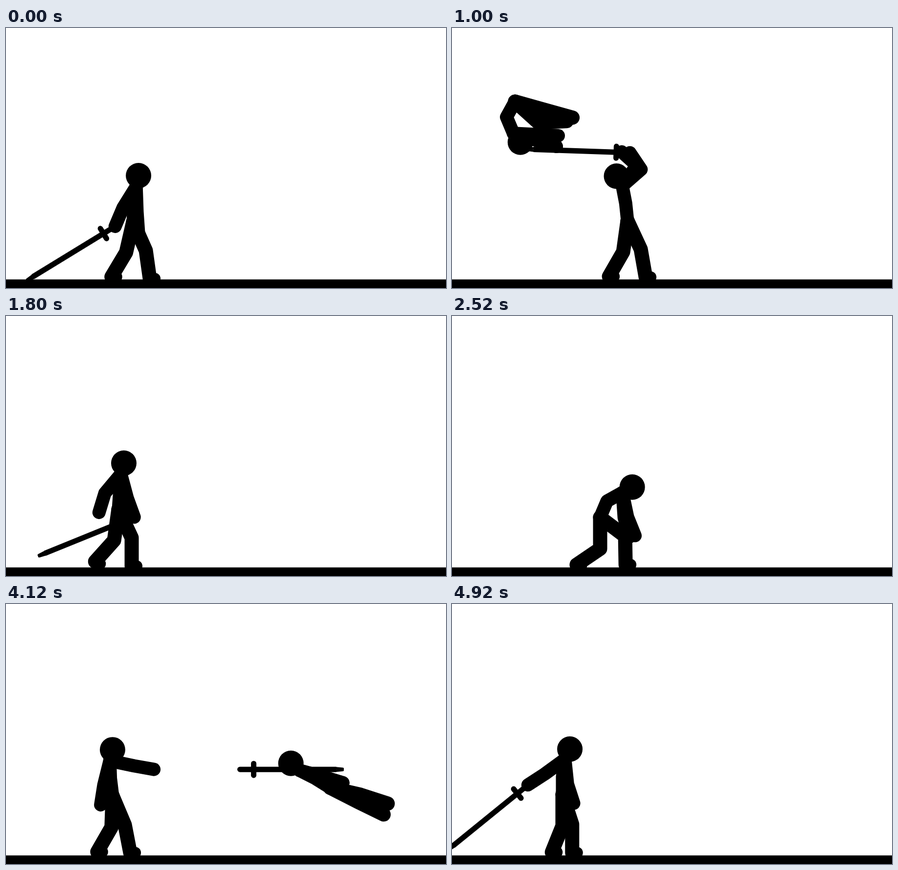
Animation of 900x530 px, one loop 4.96 s. Source, as an HTML page with a canvas:

```html
<!DOCTYPE html>
<html lang="en">
<head>
<meta charset="utf-8">
<title>Sword fighter</title>
<style>
html, body { margin: 0; width: 900px; height: 530px; overflow: hidden; background: #fff; }
canvas { display: block; }
</style>
</head>
<body>
<canvas id="stage" width="900" height="530"></canvas>
<script>
const ctx = document.getElementById('stage').getContext('2d');
const LOOP = 4960, STEP = 40, GROUND = 512.5, ANKLE = 507;
const SPINE = 36, NECK = 23, UPPER = 51, FORE = 41, THIGH = 64, SHIN = 58;
const GUARD = 28, BLADE = 197, TIP = 213;

// Limbs are [upper, lower] in degrees, clockwise on screen, 0 pointing right.
const drag = { trunk: [-87, -83, -78], sword: [122, 113], free: [88, 86],
  back: [103, 121], front: [66, 82], blade: 148.6, sink: 4 };
const thrust = { trunk: [-75, -70, -62], sword: [8, 4], free: [60, 10],
  back: [122, 142], front: [42, 88], blade: 0, sink: 0 };
const overhead = { trunk: [-96, -101, -121], sword: [-41, -124], free: [-55, -138],
  back: [98, 120], front: [65, 80], blade: -178, sink: 1 };
const march = { trunk: [-86, -86, -75], sword: [75, 70], free: [130, 107],
  back: [98, 132], front: [65, 90], blade: 158, sink: 3 };
const crouch = { trunk: [-67, -29, -29], sword: [78, 68], free: [86, 75],
  back: [90, 146], front: [37, 89], blade: 0, sink: 0 };
const point = { trunk: [-97, -92, -76], sword: [21, 21], free: [104, 99],
  back: [92, 120], front: [67, 79], blade: 0, sink: 0 };
const spear = { trunk: [-119, -128, -149], sword: [-70, 78], free: [11, -140],
  back: [94, 133], front: [75, 104], blade: -43, sink: 4 };
const rest = { trunk: [-90, -82, -64], sword: [144, 147], free: [84, 72],
  back: [90, 112], front: [72, 90], blade: 141, sink: 0 };
const lift = { ...overhead, sword: [-38, -40], free: [-30, -44], blade: -40 };
const cock = { ...point, sword: [205, 245], free: [15, 10], blade: -25 };
const idle = { ...point, sword: [95, 85], free: [112, 108] };
const beckon = { ...point, sword: [12, 10] };

const hang = { trunk: [-116, -121, -109], sword: [47, 49], free: [48, 48],
  back: [59, 58], front: [45, 50] };
const curl = { trunk: [119, 67, 52], sword: [3, 3], free: [17, 17],
  back: [15.5, 15.5], front: [42, -3] };

// Time, hip x, pose
const story = [
  [0, 260, drag], [120, 260, drag], [400, 272, drag], [680, 325, thrust],
  [840, 350, lift], [1000, 359, overhead], [1240, 356, overhead],
  [1440, 325, thrust], [1800, 230, march], [2040, 214, cock], [2160, 270, thrust],
  [2360, 303, crouch], [2520, 303, crouch], [2880, 218, idle], [3480, 218, point],
  [3680, 218, beckon], [4200, 218, beckon], [4600, 136, spear], [4920, 226, rest]
];
const RELEASE = 2160, GONE = 2360, RETURN = 3920, CATCH = 4200;

const rad = a => a * Math.PI / 180;
const reach = ([x, y], a, len) => [x + len * Math.cos(rad(a)), y + len * Math.sin(rad(a))];
const clamp = f => Math.max(0, Math.min(1, f));
const ease = f => f * f * (3 - 2 * f);

// Turns each angle the short way round.
function turn(a, b, f) {
  if (Array.isArray(a)) return a.map((v, i) => turn(v, b[i], f));
  const d = ((b - a) % 360 + 540) % 360 - 180;
  return a + d * f;
}

function blend(a, b, f) {
  const pose = {};
  for (const part in a) pose[part] = turn(a[part], b[part], f);
  return pose;
}

function rotate(pose, angle) {
  const turned = {};
  for (const part in pose) turned[part] = pose[part].map(a => a + angle);
  return turned;
}

function limb(from, [up, lo], l1, l2) {
  const joint = reach(from, up, l1);
  return [from, joint, reach(joint, lo, l2)];
}

function skeleton(x, y, pose) {
  const trunk = limb([x, y], pose.trunk, SPINE, SPINE), neck = trunk[2];
  return {
    trunk, neck,
    head: reach(neck, pose.trunk[2], NECK),
    arms: [pose.sword, pose.free].map(a => limb(neck, a, UPPER, FORE)),
    legs: [pose.back, pose.front].map(a => limb([x, y], a, THIGH, SHIN))
  };
}

// Skeleton with its lower foot on the ground.
function standing(x, pose) {
  const drop = leg => limb([0, 0], leg, THIGH, SHIN)[2][1];
  const y = ANKLE - Math.max(drop(pose.back), drop(pose.front));
  return skeleton(x, y + (pose.sink || 0), pose);
}

function fighter(t) {
  const next = story.findIndex(k => k[0] > t);
  const [t1, x1, p1] = story.at(next < 0 ? -1 : next);
  const [t0, x0, p0] = next < 0 ? story.at(-1) : story[next - 1];
  const f = t1 > t0 ? ease((t - t0) / (t1 - t0)) : 0;
  const pose = blend(p0, p1, f), x = x0 + (x1 - x0) * f;
  const stride = (x1 - x0) / 5 * Math.sin(2 * Math.PI * f);
  pose.back = pose.back.map(a => a + stride);
  pose.front = pose.front.map(a => a - stride);
  const body = standing(x, pose);
  return { x, body, hand: body.arms[0][2], blade: pose.blade };
}

function sword(t) {
  const flying = t > RELEASE && t < GONE;
  const { hand: [x, y], blade } = fighter(flying ? RELEASE : t);
  let drift = 0;
  if (flying) drift = (t - RELEASE) * 3.6;
  else if (t >= RETURN) drift = Math.max(0, CATCH - t) * 2.2;
  return { hand: [x + drift, y], angle: blade };
}

function runner(t) {
  const x = 940 - (t - 160) * 0.68, p = t / 70;
  const leg = q => [90 + 36 * Math.sin(q), 66 + 34 * Math.sin(q) - 18 * Math.cos(q)];
  const arm = q => [92 - 32 * Math.sin(q), 125 - 28 * Math.sin(q)];
  return standing(x, { trunk: [-100, -106, -118], sword: arm(p), free: arm(p + Math.PI),
    back: leg(p), front: leg(p + Math.PI) });
}

// Hangs on the blade by the neck, swaying from a start angle to rest.
function carried(t, hit, fling, sway) {
  const pose = rotate(hang, sway * (1 - ease(clamp((t - hit) / (fling - hit - 40)))));
  const { hand, angle } = sword(t);
  const [x, y] = reach(hand, angle, 112);
  const [dx, dy] = skeleton(0, 0, pose).neck;
  return skeleton(x + 10 - dx, y + 2 - dy, pose);
}

// Thrown off the blade over the fighter's back.
function thrown(t, fling) {
  const u = t - fling;
  const x = fighter(t).x - 230 - 2 * (u - 100), y = 126 + 0.0024 * u * u;
  return skeleton(x, y, rotate(blend(hang, curl, ease(clamp(u / 100))), -Math.max(0, u - 100) / 4));
}

function line(width, ...pts) {
  ctx.lineWidth = width;
  ctx.beginPath();
  pts.forEach(p => ctx.lineTo(...p));
  ctx.stroke();
}

function disc(x, y, r) {
  ctx.beginPath();
  ctx.arc(x, y, r, 0, 2 * Math.PI);
  ctx.fill();
}

function drawBody({ trunk, head, arms, legs }, facing = 0) {
  line(27, ...trunk);
  arms.forEach(arm => line(27, ...arm));
  legs.forEach(leg => {
    line(29, ...leg);
    const [x, y] = leg[2];
    if (facing) disc(x + 10 * facing, Math.max(y, ANKLE - 2), 12);
  });
  disc(...head, 26);
}

function drawSword({ hand, angle }) {
  const at = (along, side = 0) => reach(reach(hand, angle, along), angle + 90, side);
  line(11, hand, at(GUARD));
  line(11, at(GUARD, -12), at(GUARD, 12));
  ctx.lineCap = 'butt';
  line(11, at(GUARD), at(BLADE));
  ctx.lineCap = 'round';
  for (const side of [-2.5, 2.5]) line(5, at(BLADE, side), at(TIP - 3, side / 2));
}

function drawVictim(t) {
  if (t >= 160 && t < 680) drawBody(runner(t), -1);
  else if (t >= 680 && t < 900) drawBody(carried(t, 680, 900, 25));
  else if (t >= 900 && t < 1200) drawBody(thrown(t, 900));
  else if (t >= RETURN && t < 4640) drawBody(carried(t, CATCH, 4640, -32));
  else if (t >= 4640) drawBody(thrown(t, 4640));
}

function render(t) {
  ctx.fillStyle = '#fff';
  ctx.fillRect(0, 0, 900, 530);
  ctx.fillStyle = ctx.strokeStyle = '#000';
  ctx.lineCap = ctx.lineJoin = 'round';
  ctx.fillRect(0, GROUND, 900, 530 - GROUND);
  if (t < GONE || t >= RETURN) drawSword(sword(t));
  drawBody(fighter(t).body, 1);
  drawVictim(t);
}

const start = performance.now();
function tick() {
  const t = (performance.now() - start) % LOOP;
  render(Math.floor(t / STEP) * STEP);
  requestAnimationFrame(tick);
}
tick();
</script>
</body>
</html>
```
